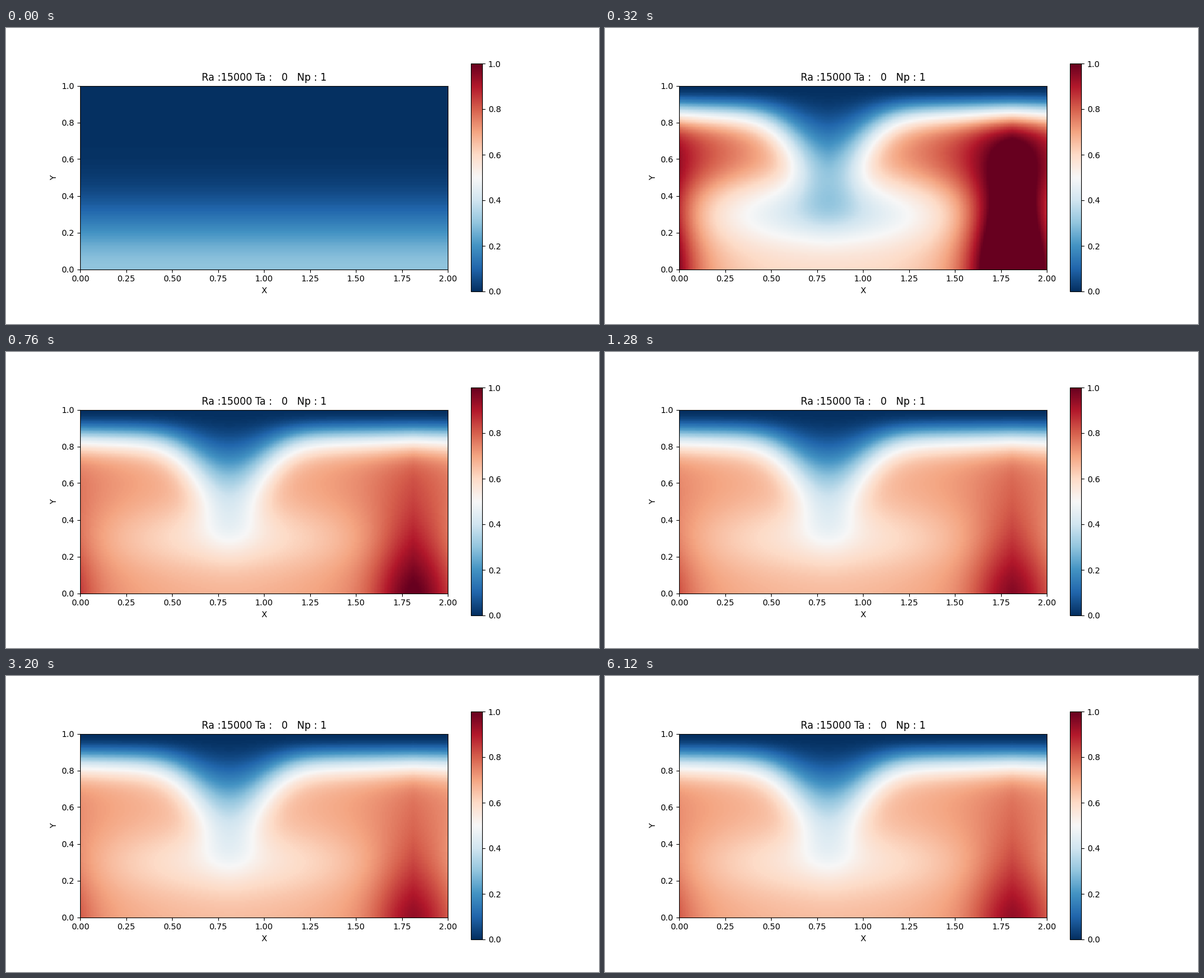
Write a matplotlib script that moves like this. It is 1000 px wide and 500 px high and loops after 6.16 s.

```python
import numpy as np
import matplotlib.pyplot as plt
from matplotlib.animation import FuncAnimation

FRAMES, INTERVAL = 154, 40
NX, NY = 256, 128
COLD_X = 0.81                # centre of the sinking plume
OVERTURN, SETTLE = 8, 13     # frames where the flow turns over, then calms

x = (np.arange(NX) + 0.5) * 2 / NX
y = (np.arange(NY)[:, None] + 0.5) / NY
u = np.abs((x - COLD_X + 1) % 2 - 1)     # 0 in the cold plume, 1 in the hot


def bell(d, width):
    return np.exp(-(d / width) ** 2)


def step(d, width):
    return 1 / (1 + np.exp(-d / width))


# cold layer under the lid, deepest above the sinking plume
depth = 0.175 + 0.225 * bell(u, 0.25)
lid = 1 - np.exp(-((1 - y) / depth) ** 2.1)


def field(base, side, swirl, puddle, stem, hot, reach):
    """Temperature of a convection cell.

    base, side: warmth in the cold plume and its rise towards the hot one
    swirl: how much the overturning skews that rise with height
    puddle, stem: cold spread at the foot of the cold plume, and its column
    hot, reach: strength and height of the hot plume
    """
    power = 2 + swirl * (1 - 2 * step(y - 0.45, 0.06))
    core = base + side * u ** power
    core = core - puddle * bell(y - 0.3, 0.18) * np.cos(np.pi * u / 2)
    core = core - stem * bell(u, 0.2) * step(y - 0.3, 0.06)
    core = core + hot * bell(1 - u, 0.215) * np.exp(-(y / reach) ** 1.5)
    return core * lid


turning = field(base=0.60, side=0.35, swirl=1, puddle=0.17, stem=0.17,
                hot=0.40, reach=0.60)
calming = field(base=0.69, side=0.14, swirl=0, puddle=0.095, stem=0.15,
                hot=0.24, reach=0.38)
steady = field(base=0.66, side=0.105, swirl=0, puddle=0.095, stem=0.12,
               hot=0.175, reach=0.32)


def heating(n):
    """Layer warmed from below, bent by the growing instability."""
    lift = 0 if n == 0 else min(0.01 * 2 ** n, 0.45)
    height = np.clip(y + lift * np.cos(np.pi * u) * np.sin(np.pi * y), 0, None)
    return 0.3 * (n + 1) ** 0.8 * bell(height, 0.317 + 0.03 * n)


def temperature(n):
    if n < OVERTURN:
        s = np.clip((n - 4) / (OVERTURN - 4), 0, 1)
        mix = s * s * (3 - 2 * s)
        return (1 - mix) * heating(n) + mix * turning
    if n < SETTLE:
        s = (n - OVERTURN) / (SETTLE - OVERTURN)
        return calming + (turning - calming) * (1 - s) ** 1.7
    return steady + (calming - steady) * np.exp(-(n - SETTLE) / 10)


fig, ax = plt.subplots(figsize=(10, 5), dpi=100)
image = ax.imshow(temperature(0), cmap="RdBu_r", vmin=0, vmax=1,
                  origin="lower", extent=(0, 2, 0, 1),
                  interpolation="nearest")
fig.colorbar(image, ax=ax)
ax.set_title("Ra :15000 Ta :   0   Np : 1")
ax.set_xlabel("X")
ax.set_ylabel("Y")


def update(n):
    image.set_data(temperature(n))
    return [image]


anim = FuncAnimation(fig, update, frames=FRAMES, interval=INTERVAL,
                     init_func=lambda: update(0), repeat=True,
                     repeat_delay=0)
plt.show()
```
